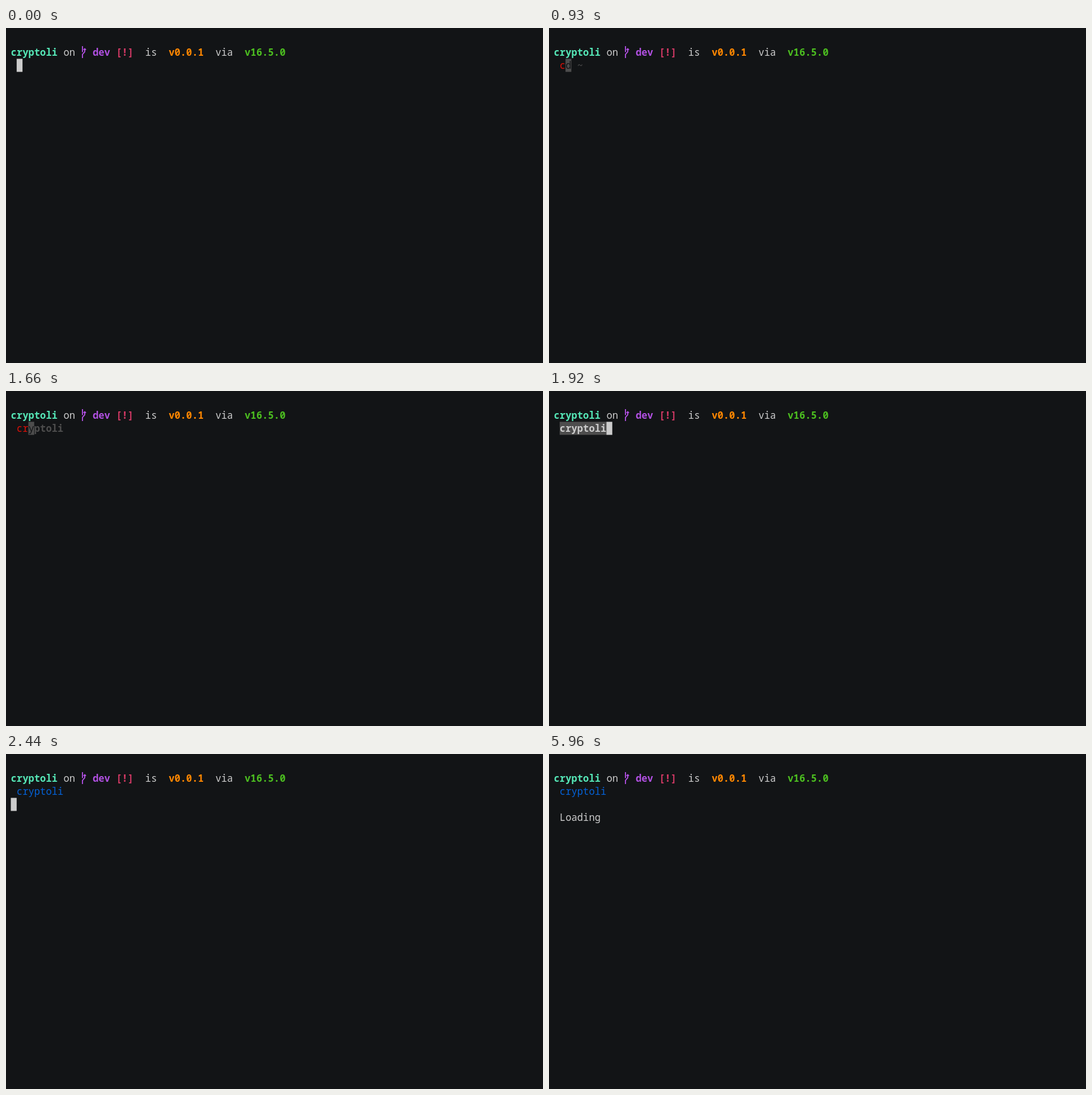
An HTML page that plays this animation: 948 px wide and 591 px high, repeating every 8000 ms.

```html
<!DOCTYPE html>
<html lang="en">
<head>
<meta charset="utf-8">
<title>Terminal</title>
<style>
  html, body { margin: 0; width: 100%; height: 100%; overflow: hidden; background: #121416; }
  svg { display: block; }
  text { font: 17.2px "Noto Sans Mono", "DejaVu Sans Mono", monospace; font-variant-ligatures: none; white-space: pre; }
  .bold { font-weight: 700; }
</style>
</head>
<body>
<svg width="948" height="591" viewBox="0 0 948 591">
  <g id="prompt"></g>
  <path d="M135 32V42.5M139 38V42L135 46.5V53M136.8 38.6L139 36.6L141.2 38.6" fill="none" stroke="#b150e2" stroke-width="1.9"/>
  <g id="screen"></g>
</svg>
<script>
const LOOP = 8000;
const CELL = { x: 8.5, y: 31.3, w: 10.32, h: 23.05, base: 17.6 };
const BG = '#121416', FG = '#cccccc', DIM = '#4d4d4d', RED = '#dd1008', BLUE = '#0462d8';

function add(parent, tag, attrs, content = '') {
  const el = document.createElementNS('http://www.w3.org/2000/svg', tag);
  for (const key in attrs) el.setAttribute(key, attrs[key]);
  el.textContent = content;
  parent.append(el);
}

const colX = col => CELL.x + col * CELL.w;
const rowY = row => CELL.y + row * CELL.h;

const text = (col, row, content, fill, bold) => parent =>
  add(parent, 'text', { x: colX(col), y: rowY(row) + CELL.base, fill, class: bold ? 'bold' : '' }, content);

const block = (col, row, fill = FG, cells = 1) => parent =>
  add(parent, 'rect', { x: colX(col), y: rowY(row), width: cells * CELL.w, height: CELL.h, fill });

const promptParts = [
  text(0, 0, 'cryptoli', '#55e6b6', true),
  text(9, 0, 'on', FG),
  text(14, 0, 'dev', '#b150e2', true),
  text(18, 0, '[!]', '#d63a66', true),
  text(23, 0, 'is', FG),
  text(27, 0, 'v0.0.1', '#ff8700', true),
  text(35, 0, 'via', FG),
  text(40, 0, 'v16.5.0', '#4cbe20', true),
];

const command = text(1, 1, 'cryptoli', BLUE);

// Each step: start time in ms, then the parts on screen.
const steps = [
  [0, block(1, 1)],
  [930, text(1, 1, 'c', RED), block(2, 1, DIM), text(2, 1, 'd', BG), text(4, 1, '~', DIM)],
  [1260, text(1, 1, 'cr', RED), block(3, 1, DIM), text(3, 1, 'y', BG), text(4, 1, 'ptoli', DIM, true)],
  [1920, block(1, 1, DIM, 8), text(1, 1, 'cryptoli', FG, true), block(9, 1)],
  [1980, command, block(9, 1)],
  [2440, command, block(0, 2)],
  [2900, command, text(1, 3, 'Loading', FG)],
];

const promptLayer = document.getElementById('prompt');
const screenLayer = document.getElementById('screen');
let shown = null;

function show(time) {
  const step = steps.filter(([start]) => start <= time).pop();
  if (step === shown) return;
  shown = step;
  screenLayer.replaceChildren();
  step.slice(1).forEach(draw => draw(screenLayer));
}

promptParts.forEach(draw => draw(promptLayer));
show(0);
const begin = performance.now();
requestAnimationFrame(function tick() {
  show(Math.max(0, performance.now() - begin) % LOOP);
  requestAnimationFrame(tick);
});
</script>
</body>
</html>
```
